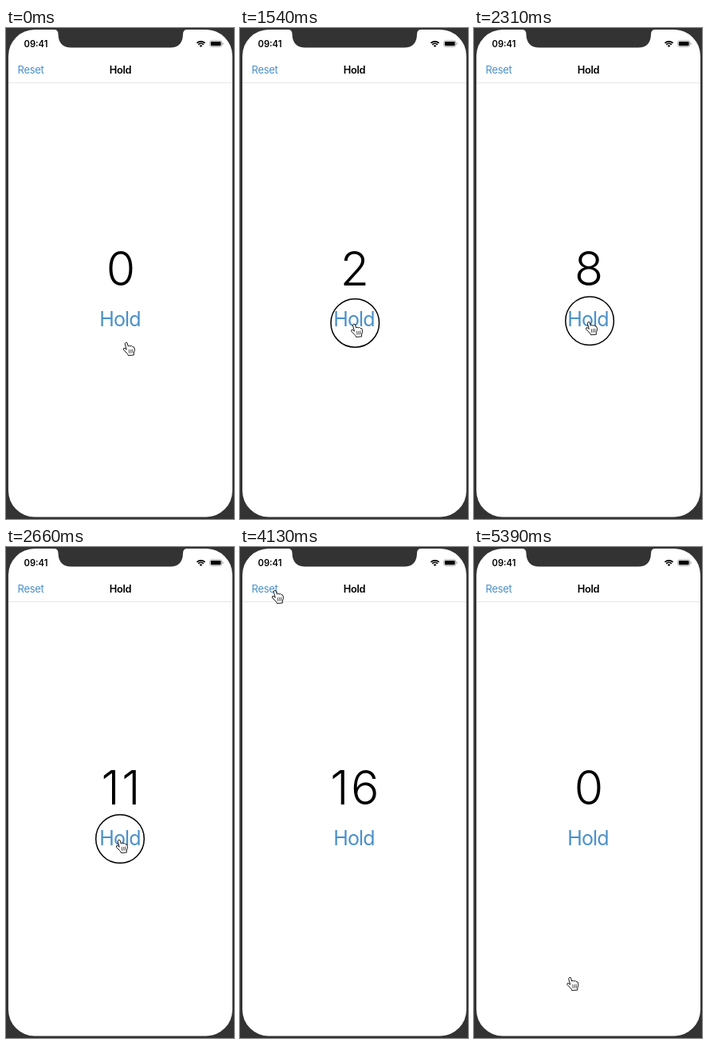
An HTML page for the animation above (5460 ms loop, 286 by 614 pixels).

```html
<!DOCTYPE html>
<html lang="en">
<head>
<meta charset="utf-8">
<title>Hold</title>
<style>
  html, body { margin: 0; width: 100%; height: 100%; overflow: hidden; background: #333; }
  svg { display: block; width: 286px; height: 614px; font-family: Inter, "Liberation Sans", sans-serif; }
  .mid { text-anchor: middle; }
  .blue { fill: #4a90c8; }
</style>
</head>
<body>
<svg viewBox="0 0 286 614">
  <rect width="286" height="614" fill="#333"/>
  <rect x="3" y="2" width="281" height="609.5" rx="33" fill="#fff"/>
  <path d="M61 0V2Q65.5 2.5 65.5 8Q66 24.5 82 24.5H206Q221.5 24.5 222 8Q222 2.5 226.5 2V0Z" fill="#333"/>

  <text x="22.5" y="24" font-size="11.2" font-weight="600">09:41</text>
  <g fill="none" stroke="#000" stroke-width="1.7">
    <path d="M239.4 18.9A7.3 7.3 0 0 1 249.6 18.9M241.2 20.8A4.7 4.7 0 0 1 247.8 20.8"/>
    <path d="M244.5 24L242.7 22.2A2.6 2.6 0 0 1 246.3 22.2Z" fill="#000" stroke="none"/>
    <rect x="255.7" y="15.8" width="15" height="7.6" rx="2.2" stroke="#999" stroke-width=".8"/>
    <rect x="256.8" y="16.9" width="12.8" height="5.4" rx="1.2" fill="#000" stroke="none"/>
    <path d="M272 18.3v2.6" stroke="#999" stroke-width="1"/>
  </g>

  <text id="reset" class="blue" x="14.6" y="56.7" font-size="13" letter-spacing="-.3">Reset</text>
  <text class="mid" x="143.5" y="56.7" font-size="12.8" font-weight="600" letter-spacing="-.3">Hold</text>
  <path d="M3 68.5H284" stroke="#e6e6e6"/>

  <text id="count" class="mid" x="145.2" y="321.7" font-size="59" font-weight="350" letter-spacing="2.5">0</text>
  <text class="mid blue" x="143" y="373" font-size="25" letter-spacing="-.8">Hold</text>

  <g id="cursor">
    <g id="ring" fill="none">
      <circle r="31" stroke="#fff" stroke-width="2.8"/>
      <circle r="30.3" stroke="#000" stroke-width="1.5"/>
    </g>
    <g transform="translate(-5.7 0)" stroke="#000" stroke-linejoin="round" stroke-linecap="round">
      <path fill="#fff" stroke-width=".9" d="M3 2.5Q4 0 5.6 1.6L7 6Q8.5 4.2 9.7 6Q11.5 4.6 12.4 6.6Q14.4 6 15 9T14 14V17L7 17.5L6.4 15.8L1 10.2Q1 7.5 3 8.7L4.6 10Z"/>
      <path fill="none" stroke-width=".7" d="M8 10.5l.4 4M10.3 10.3l.3 4M12.4 10l.2 4"/>
    </g>
  </g>
</svg>
<script>
const LOOP = 5460, STEP = 70;
const PRESS = 560, RELEASE = 3360;          // ring visible
const COUNT_START = 1220, TICK = 130, MAX = 16;
const TAP = 4480, CLEAR = 4550, TAP_END = 4690;

const home = { x: 152, y: 392 };
const moves = [
  { from: 0, to: 540, x: 152, y: 370 },       // onto the button
  { from: 980, to: 1400, x: 144, y: 369 },    // sway while holding
  { from: 1470, to: 1890, x: 148, y: 368 },
  { from: 1960, to: 2590, x: 143, y: 365 },
  { from: 2730, to: 3360, x: 145.5, y: 367 },
  { from: 3570, to: 4130, x: 45, y: 53 },     // up to Reset
  { from: 4130, to: 4270, x: 37.5, y: 53.5 },
  { from: 5180, to: 5390, x: 121.5, y: 537 }  // away
];

const $ = id => document.getElementById(id);
const clamp = (v, lo, hi) => Math.min(hi, Math.max(lo, v));
const progress = (t, from, to) => clamp((t - from) / (to - from), 0, 1);
const smooth = p => p * p * (3 - 2 * p);

function pointer(t) {
  let { x, y } = home;
  for (const m of moves) {
    const p = smooth(progress(t, m.from, m.to));
    x += (m.x - x) * p;
    y += (m.y - y) * p;
  }
  return [x, y];
}

function draw(t) {
  $("cursor").setAttribute("transform", `translate(${pointer(t)})`);
  $("ring").setAttribute("visibility", t >= PRESS && t < RELEASE ? "visible" : "hidden");
  $("count").textContent = t < CLEAR ? clamp(Math.floor((t - COUNT_START) / TICK), 0, MAX) : 0;
  $("reset").setAttribute("opacity", t < TAP ? 1 : 0.3 + 0.7 * progress(t, TAP, TAP_END));
}

const start = performance.now();
function frame() {
  const t = (performance.now() - start) % LOOP;
  draw(Math.floor(t / STEP) * STEP);
  requestAnimationFrame(frame);
}
frame();
</script>
</body>
</html>
```
